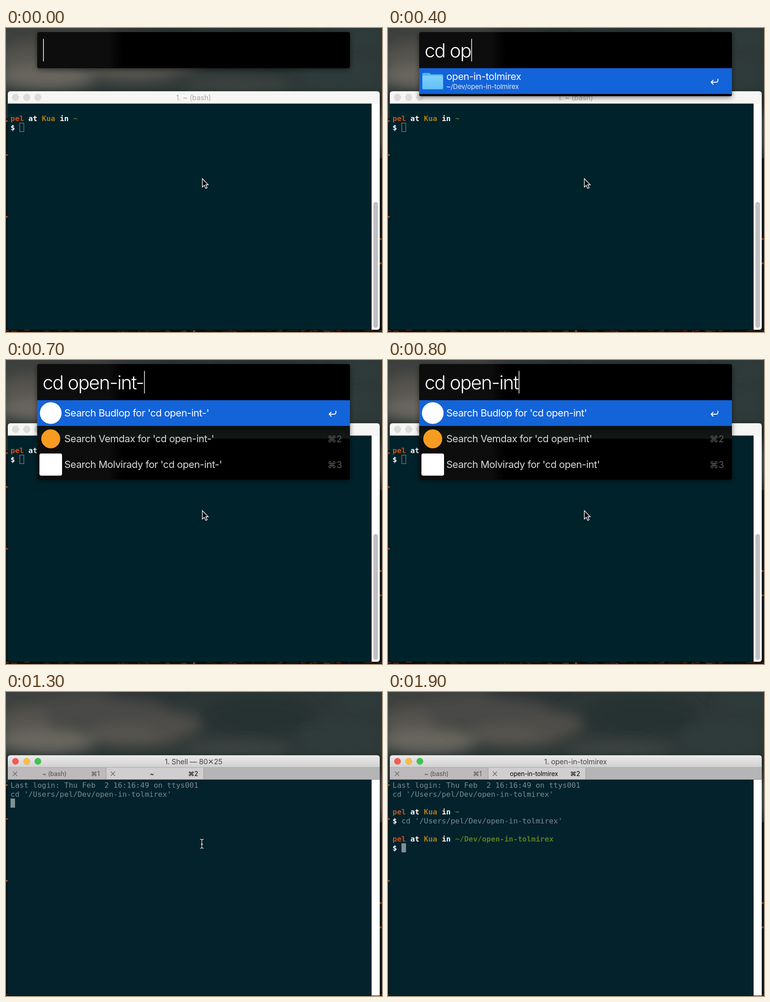
Recreate the animation shown at these times as an HTML page. Size 832 by 673 pixels, loop 2000 ms.

```html
<!DOCTYPE html>
<html lang="en">
<head>
<meta charset="utf-8">
<title>Launcher opening a shell</title>
<style>
html, body { margin: 0; width: 100%; height: 100%; overflow: hidden; background: #1d2829; }
svg { display: block; width: 832px; height: 673px; }
text { white-space: pre; font-family: Inter, "DejaVu Sans", sans-serif; }
.mono { font: 16.44px "DejaVu Sans Mono", monospace; fill: #7c8b8e; }
.mono .user, .mono .host, .mono .path, .mono .word { font-weight: bold; }
.user { fill: #c5531c; }
.host { fill: #aa7b1a; }
.path { fill: #587f1c; }
.word { fill: #fff; }
.typed { font-size: 42px; font-weight: 300; letter-spacing: -1.7px; fill: #fff; }
.label { font-size: 22px; letter-spacing: -.5px; }
.sub { font-size: 15px; letter-spacing: -.25px; }
.key { font-size: 20px; fill: #5c5c5c; text-anchor: end; }
.title { font-size: 16px; letter-spacing: -.15px; text-anchor: middle; }
.tab { font-size: 13.8px; letter-spacing: -.15px; }
.mid { text-anchor: middle; }
.line { fill: none; stroke-linecap: round; stroke-linejoin: round; }
</style>
</head>
<body>
<svg viewBox="0 0 832 673">
  <defs>
    <filter id="soft" x="-60%" y="-60%" width="220%" height="220%"><feGaussianBlur stdDeviation="14"/></filter>
    <filter id="shade" x="-10%" y="-20%" width="120%" height="150%">
      <feDropShadow dx="0" dy="3" stdDeviation="6" flood-opacity=".5"/>
    </filter>
    <linearGradient id="bar" x2="0" y2="1"><stop stop-color="#ebebeb"/><stop offset="1" stop-color="#d1d0d1"/></linearGradient>
    <linearGradient id="panel"><stop stop-color="#0c0c0c"/><stop offset=".55" stop-color="#000"/></linearGradient>
    <linearGradient id="veil" x2="0" y2="1"><stop stop-color="#0b0f0e"/><stop offset="1" stop-color="#141817"/></linearGradient>
    <linearGradient id="folder" x2="0" y2="1"><stop stop-color="#7fd0fb"/><stop offset="1" stop-color="#62c0f5"/></linearGradient>
    <linearGradient id="disc" x2="1" y2="1">
      <stop stop-color="#f4f4f4"/><stop offset=".35" stop-color="#a9a9a9"/>
      <stop offset=".6" stop-color="#e4e4e4"/><stop offset="1" stop-color="#8e8e8e"/>
    </linearGradient>
  </defs>
  <g id="sky"></g>
  <g id="stage"></g>
</svg>
<script>
const find = id => document.getElementById(id);
const rect = (x, y, w, h, fill, more = '') =>
  `<rect x="${x}" y="${y}" width="${w}" height="${h}" fill="${fill}" ${more}/>`;
const circle = (x, y, r, fill, more = '') =>
  `<circle cx="${x}" cy="${y}" r="${r}" fill="${fill}" ${more}/>`;
const text = (x, y, str, cls, fill) =>
  `<text x="${x}" y="${y}" class="${cls}" ${fill ? `fill="${fill}"` : ''}>${str}</text>`;
const line = (d, color, width) =>
  `<path class="line" d="${d}" stroke="${color}" stroke-width="${width}"/>`;
const span = (cls, str) => `<tspan class="${cls}">${str}</tspan>`;

// Cloudy backdrop: x, y, rx, ry, colour
const clouds = [
  [90, 10, 170, 30, '#3c403e'], [200, 45, 160, 35, '#4a4946'], [40, 65, 60, 30, '#55534e'],
  [90, 108, 110, 28, '#69665f'], [280, 95, 110, 25, '#57544f'], [370, 72, 60, 28, '#504e4a'],
  [330, 4, 110, 14, '#2c3332'], [560, 55, 130, 50, '#263131'], [510, 125, 120, 22, '#3b4240'],
  [740, 100, 100, 40, '#2f3a3a'], [790, 20, 60, 25, '#2f3b3b'], [828, 230, 18, 50, '#565959']
];

function drawSky() {
  let seed = 11;
  const rnd = () => (seed = seed * 16807 % 2147483647) / 2147483647;
  let out = rect(0, 0, 832, 673, '#2d3736') + '<g filter="url(#soft)">' +
    clouds.map(([x, y, rx, ry, c]) =>
      `<ellipse cx="${x}" cy="${y}" rx="${rx}" ry="${ry}" fill="${c}"/>`).join('') + '</g>' +
    rect(0, 200, 6, 473, '#101a1c') + rect(826, 288, 6, 385, '#04202b') + rect(0, 664, 832, 9, '#0b1214');
  for (let i = 0; i < 60; i++)
    out += rect(rnd() * 832, 668 + rnd() * 3, 3 + rnd() * 12, 1.5, rnd() < .25 ? '#8a3d17' : '#28302f');
  for (const [x, y] of [[0, 204], [0, 279], [0, 416], [827, 465], [827, 519], [414, 669]])
    out += rect(x, y, 4, 4, '#b4501b');
  find('sky').innerHTML = out;
}

const lights = (colors, rim) =>
  [21, 45.8, 70.5].map((x, i) => circle(x, 153.5, 7.2, colors[i], `stroke="${rim}" stroke-width=".8"`)).join('');
const project = 'open-in-tolmirex';
const cmd = `cd '/Users/pel/Dev/${project}'`;
const prompt = path => span('user', 'pel') + span('word', ' at ') + span('host', 'Kua') +
  span('word', ' in ') + span('path', path);
const dollar = span('word', '$ ');
const mono = (lines, top) => lines.map((s, i) => text(10, top + i * 19.8, s, 'mono')).join('');

function idleWindow() {
  return '<g filter="url(#shade)">' + rect(4, 140, 823, 528, '#03222c', 'rx="6"') + '</g>' +
    '<path d="M4 168V146q0-6 6-6H821q6 0 6 6V168z" fill="#f6f6f4"/>' +
    '<path d="M809 168H827V662q0 6-6 6H809z" fill="#fff"/>' +
    rect(4, 167.3, 805, 1, '#10272f') + rect(813, 385, 10, 279, '#c1c1c1', 'rx="5"') +
    lights(Array(3).fill('#dcdcdb'), '#cdcdcc') +
    text(415, 160, '1. ~ (bash)', 'title', '#a9a9a8') +
    mono([prompt('~'), dollar], 205.7) +
    rect(30.5, 210.5, 9, 19, 'none', 'stroke="#8a989b"');
}

const returnMark = line('M730 113v3q0 4-4 4H715m4.5-4.5L715 120l4.5 4.5', '#fff', 1.9);
const icons = {
  shell: y => rect(78, y - 21, 42, 42, '#262626', 'rx="4"'),
  disc: y => circle(99, y, 23, 'url(#disc)') + circle(99, y, 9, '#b9b9b9') +
    circle(99, y, 7.5, '#4a4a4a') + circle(99, y, 3, '#111'),
  folder: y => `<path d="M76 ${y - 15}q0-3 3-3h12q2 0 4 3h24q3 0 3 3v27q0 3-3 3H79q-3 0-3-3z" fill="#56b4ea"/>` +
    rect(76, y - 12, 46, 30, 'url(#folder)', 'rx="2.5"'),
  white: y => circle(99, y, 24, '#fff'),
  orange: y => circle(99, y, 21, '#f79b21'),
  square: y => rect(74, y - 24.5, 50, 49, '#fff', 'rx="4"')
};

// Each result: icon, label, optional second line
const folderRow = [['folder', project, '~/Dev/' + project]];
const shellRows = [
  ['shell', 'Open in Tolmirex...'],
  ['disc', 'CDs &amp; DVDs', '/System/Library/PreferencePanes/DigiHubDiscs.prefPane']
];
const searchRows = str => [['white', 'Budlop'], ['orange', 'Vemdax'], ['square', 'Molvirady']]
  .map(([icon, site]) => [icon, `Search ${site} for '${str}'`]);

function row([icon, label, sub], i) {
  const y = 117.5 + 57 * i;
  return (i ? text(743.5, y + 7.5, '⌘' + (i + 1), 'key') : rect(69, 89, 692, 57, '#1363d9') + returnMark) +
    icons[icon](y) +
    text(129, y + (sub ? -2.5 : 7.8), label, 'label', i ? '#d9d9d9' : '#fff') +
    (sub ? text(129, y + 17.5, sub, 'sub', i ? '#717171' : '#e0eafa') : '');
}

function launcher(str, rows) {
  const h = rows.length ? 85 + 57 * rows.length : 80;
  return '<g filter="url(#shade)">' + rect(69, 9, 692, h, 'url(#panel)', 'rx="4"') + '</g>' +
    (rows.length > 1 ? rect(69, 146, 692, 28, 'url(#veil)') : '') +
    rows.map(row).join('') +
    `<text id="typed" class="typed" x="81" y="65">${str}</text>` +
    rect(82, 24, 1.5, 50, '#fff', 'id="caret"');
}

const pointer = '<path d="M434.5 333.5v18.6l4.3-4 3.2 7 3.1-1.4-3.1-6.7h5.4z" fill="#000" stroke="#fff" stroke-width="1.4"/>';
const beamPath = 'M430 326q3.4 0 3.4 3V343q0 3-3.4 3M437 326q-3.6 0-3.6 3M437 346q-3.6 0-3.6-3M431.5 337h4';
const beam = line(beamPath, '#000', 3) + line(beamPath, '#fff', 1.3);
const cross = x => line(`M${x - 4.5} 176.5l9 9m0-9l-9 9`, '#5d5d5d', 1.1);

function activeWindow(step) {
  const done = step >= 16;
  const lines = ['Last login: Thu Feb  2 16:16:49 on ttys001', cmd];
  if (step > 13) lines.push('', prompt('~'), dollar + (step > 14 ? cmd : ''));
  if (done) lines.push('', prompt('~/Dev/' + project), dollar);
  const onPrompt = step === 14 || done;
  const at = lines.length - (onPrompt ? 1 : 0);
  return '<g filter="url(#shade)">' + rect(4, 140, 823, 532, '#03222c', 'rx="6"') + '</g>' +
    rect(4, 190, 823, 482, '#03222c') + rect(809, 194, 18, 478, '#fff') + rect(0, 672, 832, 1, '#080b0c') +
    '<path d="M4 167V146q0-6 6-6H821q6 0 6 6V167z" fill="url(#bar)"/>' +
    rect(4, 167, 823, 27, '#b6b5b6') + rect(4, 167, 217, 27, '#bcbabc') + rect(222, 167, 215, 27, '#d0ced0') +
    rect(4, 166.5, 823, 1, '#a5a4a5') + rect(221, 167, 1, 27, '#999') + rect(437, 167, 1, 27, '#999') +
    rect(4, 193.3, 823, .8, '#8b8b8b') +
    lights(['#fc5753', '#fdbc40', '#34c84a'], 'rgba(0,0,0,.14)') +
    text(415, 160, done ? '1. ' + project : '1. Shell — 80✕25', 'title', '#454545') +
    cross(20) + cross(236.5) +
    text(107, 186, '~ (bash)', 'tab mid', '#505050') + text(188, 186, '⌘1', 'tab', '#505050') +
    text(323, 186, done ? project : '~', 'tab mid', '#000') + text(403, 186, '⌘2', 'tab', '#000') +
    mono(lines, 211.9) +
    rect(onPrompt ? 29.8 : 10, 196.4 + at * 19.8, 10, 20, '#7f9097') +
    (step < 18 ? beam : '');
}

const scenes = [
  ['', []], ['c', []], ['cd', []], ['cd', shellRows],
  ['cd op', folderRow], ['cd open-', folderRow], ['cd open-in', folderRow],
  ['cd open-int-', searchRows('cd open-int-')], ['cd open-int', searchRows('cd open-int')],
  ['cd open-in', folderRow], ['cd open-in-t', folderRow],
  ['cd open-in-tolm', folderRow], ['cd ' + project, folderRow]
];

function draw(step) {
  const scene = scenes[step];
  find('stage').innerHTML = scene ? idleWindow() + launcher(...scene) + pointer : activeWindow(step);
  if (scene && scene[0])
    find('caret').setAttribute('x', 82 + find('typed').getComputedTextLength());
}

let shown = -1;
const start = performance.now();
function tick() {
  const step = Math.floor((performance.now() - start) % 2000 / 100);
  if (step !== shown) draw(shown = step);
  requestAnimationFrame(tick);
}
drawSky();
tick();
</script>
</body>
</html>
```
